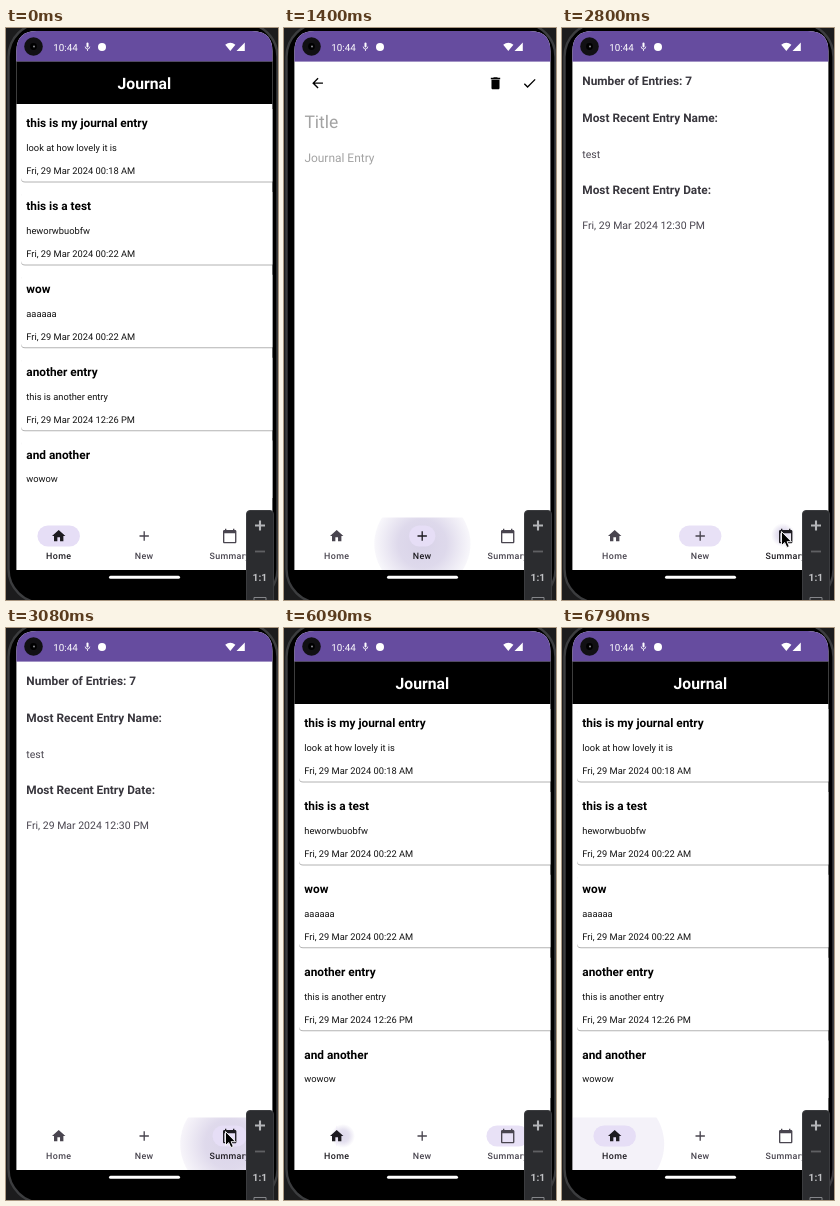
An HTML page for the animation above (8.05 s loop, 272 px wide and 572 px high).

```html
<!DOCTYPE html>
<html lang="en">
<head>
<meta charset="utf-8">
<title>Journal app</title>
<style>
html, body { margin: 0; width: 100%; height: 100%; overflow: hidden; background: #000; }
svg { display: block; width: 272px; height: 572px; }
text { font-family: Roboto, sans-serif; white-space: pre; text-rendering: geometricPrecision; }
.bold { font-weight: 700; }
.card { fill: #fff; filter: drop-shadow(0 1px .7px rgba(0, 0, 0, .3)); }
.tab { font-size: 8.9px; letter-spacing: .33px; font-weight: 500; text-anchor: middle; }
</style>
</head>
<body>
<svg id="stage" viewBox="0 0 272 572">
  <defs>
    <clipPath id="screen"><path d="M10.4 542V23Q10.4 3 31 3H246Q266.4 3 266.4 23V542Z"/></clipPath>
    <clipPath id="list"><rect x="10" y="76" width="257" height="394"/></clipPath>
    <clipPath id="bar"><rect x="10" y="489.5" width="257" height="52.5"/></clipPath>
    <radialGradient id="glow">
      <stop offset="0" stop-color="#6750a4" stop-opacity=".22"/>
      <stop offset=".5" stop-color="#6750a4" stop-opacity=".18"/>
      <stop offset=".8" stop-color="#6750a4" stop-opacity=".07"/>
      <stop offset="1" stop-color="#6750a4" stop-opacity="0"/>
    </radialGradient>
  </defs>

  <rect width="272" height="572" fill="#1c1c1d"/>
  <rect x="2.5" y="-5" width="269" height="580" rx="34" fill="#000" stroke="#3c3d3f" stroke-width="2.4"/>
  <g clip-path="url(#screen)">
    <rect x="10" y="2" width="257" height="540" fill="#fff"/>
    <rect x="10" y="2" width="257" height="31.6" fill="#664c9f"/>
    <g id="pages"></g>
    <g id="nav" clip-path="url(#bar)"></g>
  </g>

  <circle cx="27.5" cy="18.5" r="9.3" fill="#111013"/>
  <circle cx="27.5" cy="18.5" r="3.4" fill="#000"/>
  <circle cx="28" cy="18.5" r="1" fill="#8a8b90"/>
  <text x="47.3" y="22.6" font-size="9.8" fill="#fff">10:44</text>
  <g fill="none" stroke="#fff">
    <path d="M81.5 15.6v2.8" stroke-width="2" stroke-linecap="round"/>
    <path d="M79.2 18.6q0 2.4 2.3 2.4t2.3-2.4M81.5 21v2" stroke-width=".8"/>
  </g>
  <circle cx="96" cy="19" r="4" fill="#fff"/>
  <path d="M219.2 16.7Q224.3 12.7 229.4 16.7L224.3 23ZM230.5 23L238.8 14.6V23Z" fill="#fff"/>
  <rect x="103" y="547.8" width="71" height="3" rx="1.5" fill="#fff"/>

  <g id="toolbar">
    <path d="M240.5 572V486q0-3.5 3.5-3.5H264q3.5 0 3.5 3.5V572" fill="#2b2c2f" stroke="#3b3c3f"/>
    <path d="M249 497.5h10M254 492.5v10" stroke="#b4b5b8" stroke-width="2.1"/>
    <path d="M249 523.5h10" stroke="#5f6063" stroke-width="1.8"/>
    <text x="253.9" y="552.6" font-size="10.2" class="bold" text-anchor="middle" fill="#c0c1c4">1:1</text>
    <path d="M248 572v-2.5h12v2.5" fill="none" stroke="#85868a"/>
  </g>
  <path id="cursor" d="M219.5 503.5v14l3.2-3 2.2 5 2.4-1-2.2-4.8h4.4Z" fill="#000" stroke="#fff" stroke-width=".9"/>
</svg>

<script>
const LOOP = 8050, STEP = 70;
const $ = id => document.getElementById(id);
const clamp = v => Math.min(1, Math.max(0, v));
const mix = (a, b, k) => a + (b - a) * k;

const text = (x, y, size, str, fill = '#111', cls = '') =>
  `<text x="${x}" y="${y}" font-size="${size}" fill="${fill}" class="${cls}">${str}</text>`;
const ICONS = {
  home: 'M10 20v-6h4v6h5v-8h3L12 3 2 12h3v8z',
  add: 'M19 13h-6v6h-2v-6H5v-2h6V5h2v6h6v2z',
  calendar: 'M20 3h-1V1h-2v2H7V1H5v2H4c-1.1 0-2 .9-2 2v16c0 1.1.9 2 2 2h16c1.1 0 2-.9 2-2V5c0-1.1-.9-2-2-2zm0 18H4V8h16v13z',
  back: 'M20 11H7.83l5.59-5.59L12 4l-8 8 8 8 1.41-1.41L7.83 13H20v-2z',
  trash: 'M6 19c0 1.1.9 2 2 2h8c1.1 0 2-.9 2-2V7H6v12zM19 4h-3.5l-1-1h-5l-1 1H5v2h14V4z',
  check: 'M9 16.17L4.83 12l-1.42 1.41L9 19 21 7l-1.41-1.41z'
};
const icon = (name, x, y, id = '') =>
  `<path ${id && `id="${id}"`} d="${ICONS[name]}" transform="translate(${x} ${y}) scale(.67) translate(-12 -12)"/>`;

const entries = [
  ['this is my journal entry', 'look at how lovely it is', '00:18 AM'],
  ['this is a test', 'heworwbuobfw', '00:22 AM'],
  ['wow', 'aaaaaa', '00:22 AM'],
  ['another entry', 'this is another entry', '12:26 PM'],
  ['and another', 'wowow', '12:30 PM']
];
const card = ([title, body, time], i) => `<g transform="translate(0 ${i * 82.9})">
  <rect class="card" x="15" y="81" width="262" height="72.5" rx="4"/>
  ${text(20.3, 99.1, 11.85, title, '#000', 'bold')}
  ${text(20.3, 122.9, 9.3, body)}
  ${text(20.3, 145.9, 9.3, 'Fri, 29 Mar 2024 ' + time)}</g>`;

const pages = [
  `<rect x="10" y="33.5" width="257" height="42.5"/>
   <text x="138.3" y="61.3" font-size="15.7" class="bold" text-anchor="middle" fill="#fff">Journal</text>
   <g clip-path="url(#list)">${entries.map(card).join('')}</g>`,
  icon('back', 33.6, 55.2) + icon('trash', 211.5, 55.2) + icon('check', 245.6, 55.2) +
    text(20.4, 99.5, 17.5, 'Title', '#a3a3a3') + text(20.4, 134, 11.95, 'Journal Entry', '#a3a3a3'),
  [[57.3, 'Number of Entries: 7'], [94, 'Most Recent Entry Name:'], [165.8, 'Most Recent Entry Date:']]
    .map(([y, s]) => text(20.3, y, 11.85, s, '#38363d', 'bold')).join('') +
    text(20.3, 129.8, 10.5, 'test', '#49454f') + text(20.3, 201.2, 10.5, 'Fri, 29 Mar 2024 12:30 PM', '#49454f')
];
$('pages').innerHTML = pages.map((p, i) => `<g id="page${i}">${p}</g>`).join('');

const tabs = [['Home', 'home', 52.7], ['New', 'add', 138.2], ['Summary', 'calendar', 223.7]];
$('nav').innerHTML = '<circle id="flat" fill="#6750a4" fill-opacity=".07"/><circle id="soft" fill="url(#glow)"/>' +
  tabs.map(([label, name, x], i) => `<rect id="pill${i}" y="497.5" height="21" rx="10.5" fill="#e6def6"/>
    ${icon(name, x, 508, 'icon' + i)}<text id="label${i}" class="tab" x="${x}" y="531.3">${label}</text>`).join('');

// lead: how far the press has already run when its page appears; end: when the ripple is gone
const taps = [
  { at: 1400, tab: 1, from: 0, lead: 210, end: 2030, px: 143, py: 511 },
  { at: 2800, tab: 2, from: 1, lead: 0, end: 3570, px: 221, py: 507 },
  { at: 6090, tab: 0, from: 2, lead: 0, end: LOOP, px: 59, py: 508 }
];

function setCircle(id, x, y, r, opacity) {
  const c = $(id);
  c.setAttribute('cx', x);
  c.setAttribute('cy', y);
  c.setAttribute('r', r);
  c.setAttribute('opacity', opacity);
}

function draw(t) {
  const tap = taps.filter(p => p.at <= t).pop();
  const active = tap ? tap.tab : 0;
  const age = tap ? t - tap.at + tap.lead : LOOP;

  tabs.forEach(([, , x], i) => {
    const on = i === active;
    $('page' + i).style.display = on ? '' : 'none';
    const width = on ? 42.5 * clamp((age + 20) / 370) : 42.5;
    const leaving = tap && i === tap.from;
    const pill = $('pill' + i);
    pill.setAttribute('x', x - width / 2);
    pill.setAttribute('width', width);
    pill.setAttribute('opacity', on ? clamp(.3 + age / 250) : leaving ? .9 * clamp(1 - age / 180) : 0);
    const color = on ? '#1d1b20' : '#49454f';
    $('icon' + i).setAttribute('fill', color);
    $('label' + i).setAttribute('fill', color);
  });

  if (tap && t < tap.end) {
    const grow = 1 - (1 - clamp(age / 260)) ** 2;
    const x = mix(tap.px, tabs[tap.tab][2], grow), y = mix(tap.py, 516, grow);
    const r = mix(12, 49.5, grow);
    setCircle('flat', x, y, r, clamp(age / 350));
    setCircle('soft', x, y, r, clamp((650 - age) / 400));
  } else {
    setCircle('flat', 0, 0, 0, 0);
    setCircle('soft', 0, 0, 0, 0);
  }
  $('cursor').style.display = t >= 2800 && t < 3850 ? '' : 'none';
}

const start = performance.now();
function tick() {
  const t = (performance.now() - start) % LOOP;
  draw(Math.floor(t / STEP) * STEP);
  requestAnimationFrame(tick);
}
tick();
</script>
</body>
</html>
```
